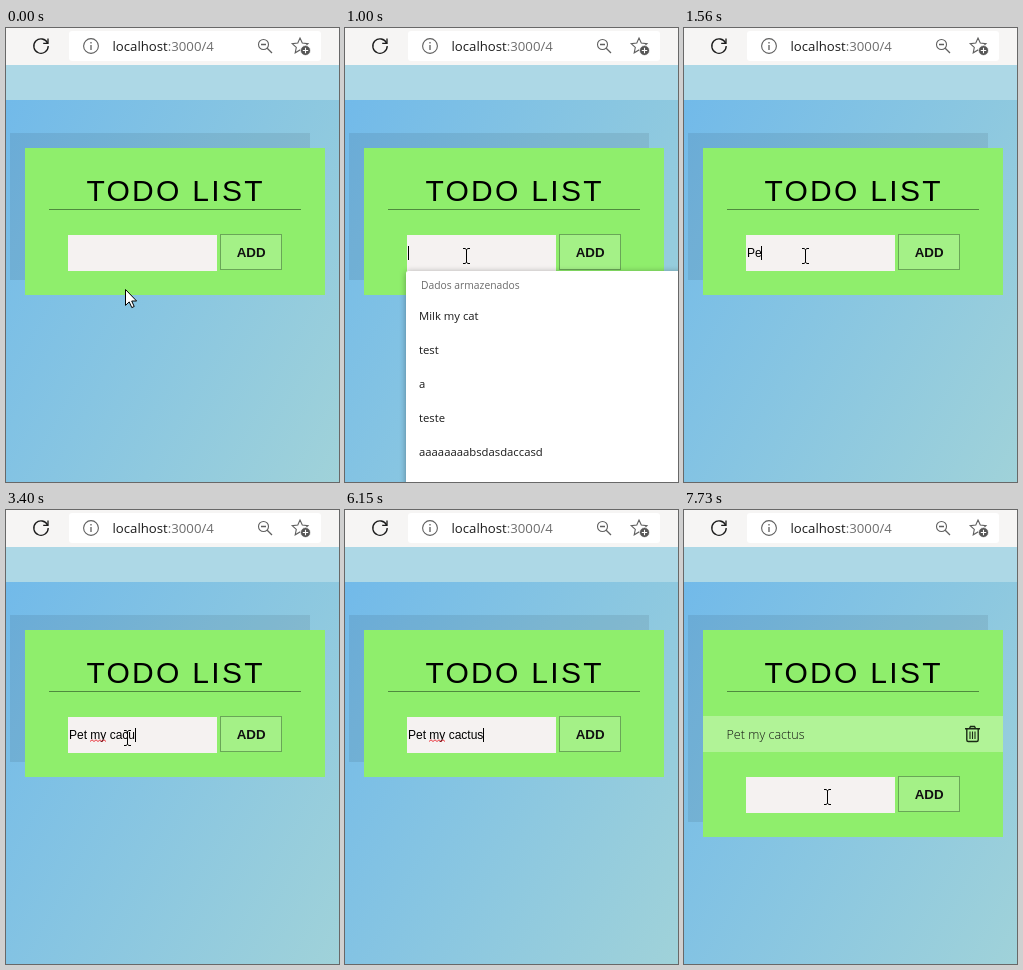
An HTML page for the animation above (8000 ms loop, 333 by 454 pixels).

```html
<!DOCTYPE html>
<html lang="en">
<head>
<meta charset="utf-8">
<title>Todo list</title>
<style>
  html, body { margin: 0; width: 100%; height: 100%; overflow: hidden; }
  svg { display: block; width: 333px; height: 454px; }
  text { white-space: pre; }
  .ui { font-family: "Open Sans", "Noto Sans", sans-serif; }
  .form { font-family: "Liberation Sans", Arial, sans-serif; }
  .line { fill: none; stroke: #5f5f5f; stroke-width: 1.1; }
  #popup { transform-origin: 228px 357px; }
  #popup rect { filter: drop-shadow(0 1px 3px rgba(0, 0, 0, .35)); }
  .wave { fill: none; stroke: #e8202a; stroke-width: .9; }
</style>
</head>
<body>
<svg viewBox="0 0 333 454" xmlns="http://www.w3.org/2000/svg">
  <defs>
    <linearGradient id="sky" gradientUnits="userSpaceOnUse" x1="0" y1="37" x2="433" y2="267">
      <stop offset="0" stop-color="#70b9ea"/>
      <stop offset="1" stop-color="#a0d2d9"/>
    </linearGradient>
  </defs>

  <!-- page -->
  <rect width="333" height="454" fill="url(#sky)"/>
  <rect y="37" width="333" height="35" fill="#add8e6"/>

  <!-- browser bar -->
  <rect width="333" height="37" fill="#f6f5f4"/>
  <rect x="63" y="3" width="252" height="30" rx="3" fill="#fff"/>
  <g fill="none" stroke="#1b1b1b" stroke-width="1.3">
    <path d="M41.6 15.2A7.2 7.2 0 1 0 42.2 18"/>
    <path d="M42 10.5V15.3H37.2"/>
  </g>
  <g class="line">
    <circle cx="85" cy="18" r="7.4"/>
    <path d="M85 17V22M85 14V15.4" stroke-width="1.3"/>
    <circle cx="257.5" cy="16.5" r="5"/>
    <path d="M255 16.5H260M261.2 20.2L266 25" stroke-width="1.3"/>
    <path d="M294 10L296.3 15 302 15.6 297.8 19.4 299 24.8 294 22 289.2 24.8 290.3 19.4 286.2 15.6 291.8 15Z"/>
  </g>
  <circle cx="299.5" cy="22.5" r="5" fill="#555" stroke="#fff" stroke-width=".8"/>
  <path d="M296.8 22.5H302.2M299.5 19.8V25.2" stroke="#fff" stroke-width="1.1"/>
  <text class="ui" x="106.5" y="23" font-size="13.2" fill="#1b1b1b">localhost<tspan fill="#6e6e6e">:3000/4</tspan></text>

  <!-- card -->
  <rect id="shade" x="4" y="105" width="300" height="147" fill="#000" opacity=".08"/>
  <rect id="card" x="19" y="120" width="300" height="147" fill="#8fee6c"/>
  <text class="form" x="80.4" y="173" font-size="30" letter-spacing="2.3">TODO LIST</text>
  <rect x="43" y="181" width="252" height="1" fill="#4f8a3e"/>

  <g id="item">
    <rect x="19" y="206" width="300" height="36" fill="#b1f397"/>
    <text class="ui" x="42.5" y="229" font-size="12.6" font-weight="300" fill="#111">Pet my cactus</text>
    <g fill="none" stroke="#1b2a16" stroke-width="1.4">
      <path d="M281 218.7H296M285.5 218.5L286.5 216.5H290.5L291.5 218.5"/>
      <path d="M282.8 219V230Q282.8 231.5 284.3 231.5H292.7Q294.2 231.5 294.2 230V219"/>
      <path d="M286 221.5V229M288.5 221.5V229M291 221.5V229" stroke-width="1.1"/>
    </g>
  </g>

  <g id="row">
    <rect x="62" y="207" width="149" height="36" fill="#f5f2f1"/>
    <text id="typed" class="form" x="63" y="229" font-size="12"></text>
    <path id="wave1" class="wave"/>
    <path id="wave2" class="wave"/>
    <rect id="caret" y="218" width="1" height="14"/>
    <rect x="214.5" y="206.5" width="61" height="35" fill="#a4f187" stroke="#69a657"/>
    <text class="form" x="230.7" y="229" font-size="13.33" font-weight="700" fill="#111">ADD</text>
  </g>

  <g id="popup" class="ui" font-size="11.3" fill="#1b1b1b">
    <rect x="61" y="243" width="334" height="228" rx="2" fill="#fff"/>
    <text x="76" y="261" font-size="10.3" fill="#6b6b6b">Dados armazenados</text>
  </g>

  <path id="arrow" d="M.5 .5V16.4L4.2 12.9 6.8 18.6 9.2 17.5 6.7 12H11.6Z" fill="#fff" stroke="#000"/>
  <path id="beam" d="M-3 -7.5H-1L.5 -6.5 2 -7.5H4M.5 -6.5V6.5M-3 7.5H-1L.5 6.5 2 7.5H4" fill="none" stroke="#000"/>
</svg>
<script>
const LOOP = 8000;
const $ = id => document.getElementById(id);

// time, text in the field
const typing = [
  [0, ""], [1380, "P"], [1470, "Pe"], [1650, "Pet"], [1930, "Pet "], [2300, "Pet m"],
  [2570, "Pet my"], [2860, "Pet my "], [2950, "Pet my c"], [3130, "Pet my ca"],
  [3220, "Pet my cac"], [3400, "Pet my cacu"], [3580, "Pet my cacut"], [3760, "Pet my cacuts"],
  [5430, "Pet my cacut"], [5610, "Pet my cacu"], [5790, "Pet my cac"], [5880, "Pet my cact"],
  [5970, "Pet my cactu"], [6150, "Pet my cactus"], [6530, ""]
];
// time, caret shown
const blink = [[0, 0], [910, 1], [4230, 0], [4780, 1], [5250, 0], [5790, 1], [6710, 0], [7180, 1], [7730, 0]];
// time, pointer kind, x, y
const pointer = [
  [0, "arrow", 119, 261], [90, "arrow", 119, 256], [180, "arrow", 119, 246],
  [270, "beam", 121, 231], [360, "beam", 121, 228], [1470, "arrow", 119, 227],
  [1560, "beam", 121, 228], [4600, "beam", 168, 232], [4690, "arrow", 249, 236], [4780, ""],
  [7180, "arrow", 221, 271], [7270, "beam", 188, 284], [7360, "beam", 157, 286], [7450, "beam", 143, 287]
];
// time, popup opacity, scale
const popup = [[0, 0, 1], [910, .5, .985], [1000, 1, 1], [1470, .45, .97], [1560, 0, 1]];
// time, shown
const misspelt1 = [[0, 0], [2860, 1], [6530, 0]];
const misspelt2 = [[0, 0], [4600, 1], [5430, 0]];
const added = [[0, 0], [6530, 1]];

const at = (table, t) => table.findLast(row => row[0] <= t).slice(1);
const show = (id, on) => $(id).setAttribute("visibility", on ? "visible" : "hidden");

const pen = document.createElement("canvas").getContext("2d");
pen.font = '12px "Liberation Sans", Arial, sans-serif';
const caretX = text => Math.floor(63.1 + pen.measureText(text).width);

function wave(id, from, to) {
  let d = `M${from} 231.5`;
  for (let x = from + 2, up = 1; x <= to; x += 2, up = 1 - up) d += `L${x} ${up ? 229.8 : 231.5}`;
  $(id).setAttribute("d", d);
}
wave("wave1", 84, 100);
wave("wave2", 104, 138);

["Milk my cat", "test", "a", "teste", "aaaaaaaabsdasdaccasd", "4"].forEach((label, i) => {
  const el = document.createElementNS("http://www.w3.org/2000/svg", "text");
  el.setAttribute("x", 74);
  el.setAttribute("y", 292 + 34 * i);
  el.textContent = label;
  $("popup").append(el);
});

function draw(t) {
  const [text] = at(typing, t);
  $("typed").textContent = text;
  $("caret").setAttribute("x", caretX(text));
  show("caret", at(blink, t)[0]);
  show("wave1", at(misspelt1, t)[0]);
  show("wave2", at(misspelt2, t)[0]);

  const [isAdded] = at(added, t);
  const grow = isAdded ? 60 : 0;
  show("item", isAdded);
  $("card").setAttribute("height", 147 + grow);
  $("shade").setAttribute("height", 147 + grow);
  $("row").setAttribute("transform", `translate(0 ${grow})`);

  const [alpha, scale] = at(popup, t);
  $("popup").style.opacity = alpha;
  $("popup").style.transform = `scale(${scale})`;

  const [kind, x, y] = at(pointer, t);
  for (const id of ["arrow", "beam"]) show(id, id === kind);
  if (kind) $(kind).setAttribute("transform", `translate(${x} ${y})`);
}

const start = performance.now();
function tick() {
  draw((performance.now() - start) % LOOP);
  requestAnimationFrame(tick);
}
tick();
</script>
</body>
</html>
```
